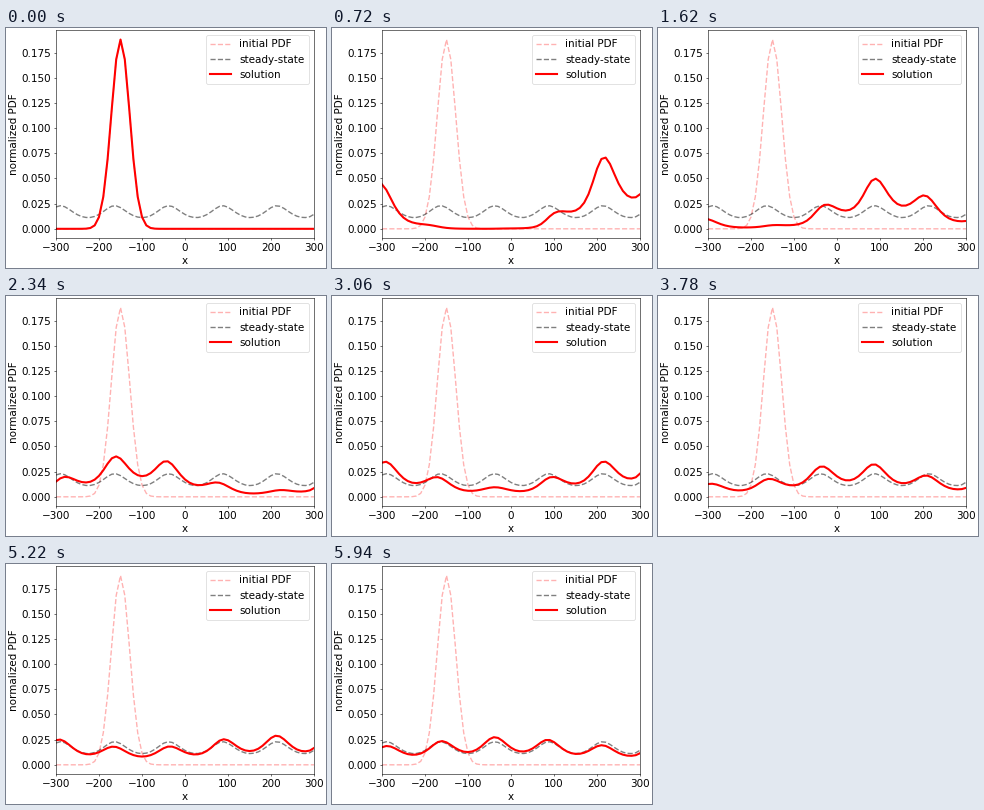
Animation, 320 px wide and 240 px high, one loop 6120 ms. Source, as a matplotlib script:

```python
import numpy as np
import matplotlib.pyplot as plt
from matplotlib.animation import FuncAnimation

FRAMES, INTERVAL = 34, 180
STEP_TIME = 60e-6                     # simulated seconds per frame

# Brownian particle in a tilted periodic force, periodic boundary
NM = 1e-9
KT = 1.380649e-23 * 300
DRAG = 6 * np.pi * 8e-4 * 50 * NM
DX = 10 * NM
L = 20 * NM

x = np.arange(-300, 301, 10) * NM


def force(pos):
    return 5e-21 * (np.sin(pos / L) + 4) / L


def rate_matrix():
    """Hopping rates between neighbouring cells, force taken at the cell edges."""
    n = len(x)
    base = KT / DRAG / DX**2
    right = base * np.exp(force(x + DX / 2) * DX / (2 * KT))
    left = base * np.exp(-force(x - DX / 2) * DX / (2 * KT))
    i = np.arange(n)
    rates = np.zeros((n, n))
    rates[(i + 1) % n, i] = right
    rates[(i - 1) % n, i] = left
    rates[i, i] = -(right + left)
    return rates


def propagator(rates, t, splits=4096):
    small = rates * t / splits
    step = np.eye(len(x)) + small + small @ small / 2
    return np.linalg.matrix_power(step, splits)


def steady_state(rates):
    system = rates / np.abs(rates).max()
    system[-1] = 1
    rhs = np.zeros(len(x))
    rhs[-1] = 1
    return np.linalg.solve(system, rhs)


rates = rate_matrix()
steady = steady_state(rates)
initial = np.exp(-((x + 150 * NM) / (30 * NM))**2)
initial /= initial.sum()

advance = propagator(rates, STEP_TIME)
history = [initial]
for _ in range(FRAMES - 1):
    history.append(advance @ history[-1])

plt.rcParams.update({"font.family": "DejaVu Sans", "font.size": 15})
fig, ax = plt.subplots(figsize=(6.4, 4.8), dpi=50, layout="constrained")
inset = 0.5 / 320                     # half a pixel of extra left margin
fig.get_layout_engine().set(rect=(inset, 0, 1 - inset, 1))

ax.plot(x / NM, initial, color="red", ls="--", lw=2, alpha=0.3,
        label="initial PDF")
ax.plot(x / NM, steady, color="black", ls="--", lw=2, alpha=0.5,
        label="steady-state")
line, = ax.plot(x / NM, initial, color="red", lw=3, label="solution")
ax.margins(x=0)
ax.set(xlabel="x", ylabel="normalized PDF")
ax.legend(loc="upper right")


def update(frame):
    line.set_ydata(history[frame])
    return line,


anim = FuncAnimation(fig, update, frames=FRAMES, interval=INTERVAL,
                     repeat=True, repeat_delay=0)
plt.show()
```
